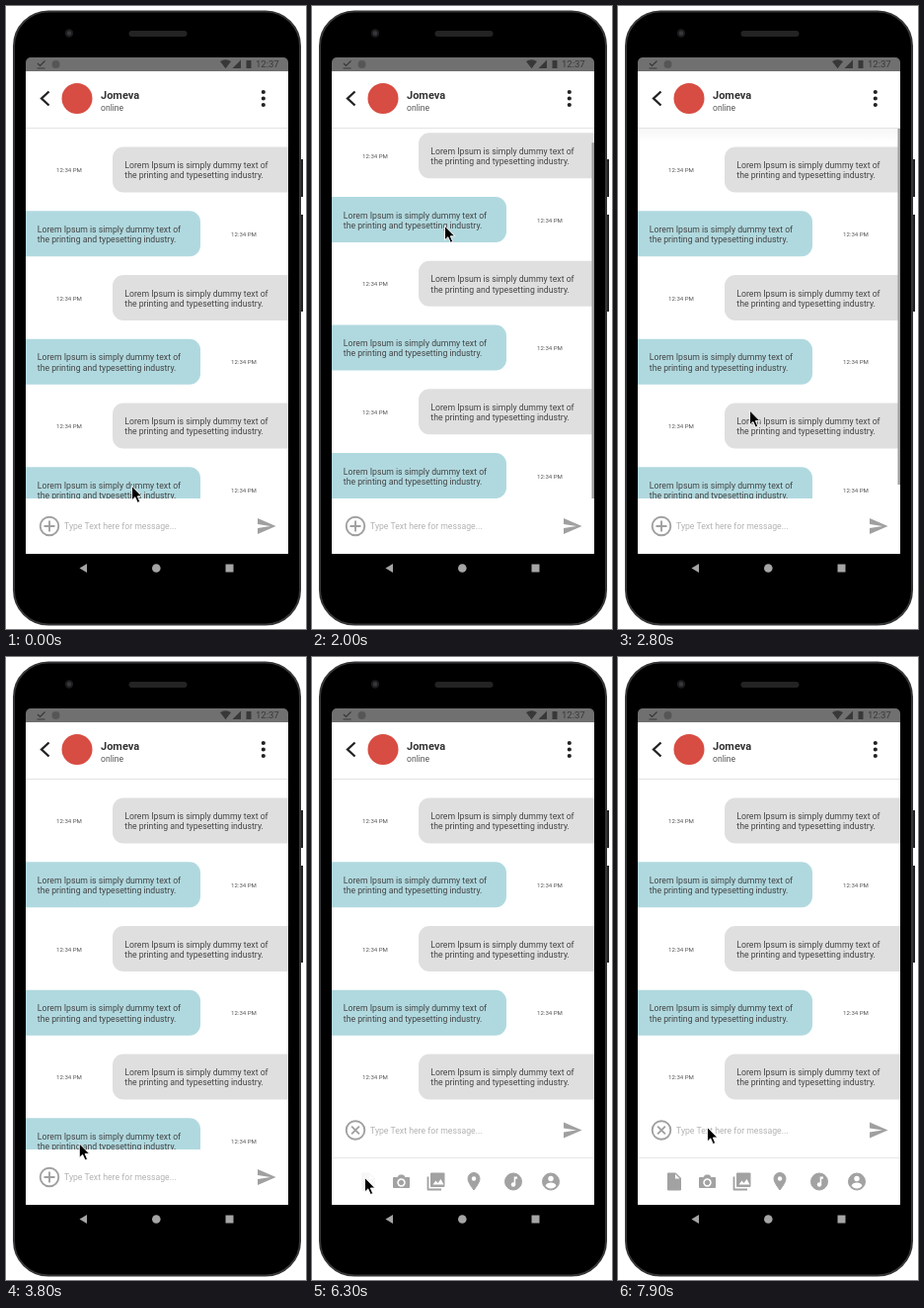
Recreate the animation shown at these times as an HTML page. Size 304 by 630 pixels, loop 8 s.

```html
<!DOCTYPE html>
<html lang="en">
<head>
<meta charset="utf-8">
<title>Chat screen</title>
<style>
  html, body { margin: 0; width: 100%; height: 100%; overflow: hidden; background: #fff; }
  svg { display: block; width: 304px; height: 630px; font: 8.7px Roboto, sans-serif; }
  .msg { fill: #444; }
  .time { font-size: 6.1px; fill: #555; text-anchor: middle; }
  .icon { fill: #a2a2a2; stroke: #a2a2a2; stroke-linejoin: round; }
  .hole { fill: #fff; stroke: none; }
</style>
</head>
<body>
<svg viewBox="0 0 304 630">
  <defs>
    <clipPath id="listClip"><rect id="listArea" x="20" y="124" width="266" height="374"/></clipPath>
    <linearGradient id="shade" x2="0" y2="1">
      <stop stop-opacity=".035"/>
      <stop offset="1" stop-opacity="0"/>
    </linearGradient>
  </defs>

  <!-- phone -->
  <path d="M297 155h4v38h-4zM297 211h4v98h-4z" fill="#222"/>
  <rect x="8" y="5.500" width="290" height="620" rx="35" stroke="#343536" stroke-width="2"/>
  <circle cx="64" cy="27.500" r="3.200" fill="#37383b" stroke="#1c1c1e" stroke-width="2"/>
  <rect x="124.500" y="25" width="59" height="6" rx="3" fill="#232323"/>

  <!-- status bar -->
  <rect x="20" y="52" width="266" height="24" rx="5" fill="#707070"/>
  <g fill="#383838">
    <path d="M32 58l2.500 2.500 5-5M31.500 63h8" fill="none" stroke="#383838" stroke-width="1.200"/>
    <circle cx="50.500" cy="59" r="4" opacity=".45"/>
    <path d="M217 56q5.500-3.500 11 0l-5.500 7.200zM238 54.500v8.500h-8.500zM243.500 55h5v8h-5z"/>
    <text x="253" y="62.300" font-size="9.500">12:37</text>
  </g>
  <rect x="20" y="66" width="266" height="488" fill="#fff"/>

  <!-- messages -->
  <g clip-path="url(#listClip)">
    <g id="list"></g>
    <rect id="glow" x="20" y="124" width="266" height="14" fill="url(#shade)"/>
    <rect id="bar" x="283.500" y="124" width="2.500" height="360" fill="#a0a0a0"/>
  </g>

  <!-- header -->
  <path d="M20 123.500h266" stroke="#e3e3e3"/>
  <path d="M43.500 86.500l-7.500 7 7.500 7" fill="none" stroke="#222" stroke-width="2.300"/>
  <circle cx="72" cy="93.500" r="15.500" fill="#d84d43"/>
  <text x="96" y="94" font-size="11" font-weight="700" fill="#333">Jomeva</text>
  <text x="96" y="106" font-size="8.600" fill="#555">online</text>
  <path d="M260.800 87v14" stroke="#222" stroke-width="4.200" stroke-linecap="round" stroke-dasharray="0 6.500"/>

  <!-- input row and attachment panel -->
  <g id="inputRow">
    <g id="toggle" fill="none" stroke="#a0a0a0" stroke-width="1.900">
      <circle cx="44" cy="526" r="9.300"/>
      <path id="cross" d="M38.500 526h11M44 520.500v11"/>
    </g>
    <text x="59" y="529" fill="#b3b3b3">Type Text here for message...</text>
    <path d="M255 534l18.500-8-18.500-8v6l13 2-13 2z" fill="#a0a0a0"/>
  </g>
  <g id="panel"><path d="M20 506.500h266" stroke="#e8e8e8"/></g>

  <!-- navigation bar -->
  <g fill="#a5a5a5">
    <path d="M82 564v9l-7.500-4.500z"/>
    <circle cx="152.300" cy="568.500" r="4.300"/>
    <path d="M222.500 564.500h8v8h-8z"/>
  </g>

  <path id="cursor" d="M.5 .5v14.500l3.300-3.100 2.500 5.600 2.400-1-2.400-5.500h4.500z" stroke="#fff" stroke-width=".9"/>
</svg>

<script>
const LOOP = 8000, PANEL_OPENS = 4850, PANEL_SHIFT = 47.5, SCROLL_RANGE = 14.2;
const $ = id => document.getElementById(id);
const set = (id, name, value) => $(id).setAttribute(name, value);

// Outer bubble ends run past the list edge and are clipped there.
function message(i) {
  const y = 142.5 + i * 64.75, mine = i % 2 === 0;
  const line = (text, dy) => `<text class="msg" x="${mine ? 120.3 : 31.8}" y="${y + dy}">${text}</text>`;
  return `<rect x="${mine ? 108 : 7}" y="${y}" width="190" height="46" rx="11" fill="${mine ? '#dfdfdf' : '#b0d9df'}"/>`
    + line('Lorem Ipsum is simply dummy text of', 21.5)
    + line('the printing and typesetting industry.', 31.8)
    + `<text class="time" x="${mine ? 64 : 241}" y="${y + 25.6}">12:34 PM</text>`;
}
$('list').innerHTML = Array.from({ length: 6 }, (_, i) => message(i)).join('');

// Attachment icons, each drawn around its own centre.
const path = (d, attrs = '') => `<path d="${d}" ${attrs}/>`;
const disc = (y, r, attrs = '') => `<circle cy="${y}" r="${r}" ${attrs}/>`;
const hole = 'class="hole"';
function icon(id, x, shapes) {
  $('panel').innerHTML += `<g id="${id}" class="icon" transform="translate(${x} 530.5)">${shapes}</g>`;
}
icon('file', 57, path('M-6.500-8.500H1.500l5 5V8.500h-13z') + path('M1-7.500V-3H5.500z', hole));
icon('camera', 90.5, path('M-8-4h4l2-2.500h4l2 2.500h4v10H-8z') + disc(1, 4.2, hole) + disc(1, 2.2));
icon('gallery', 125.5, path('M-5-8.500H8.500V5H-5z') + path('M-8-5V8H5.500', 'fill="none" stroke-width="1.800"')
  + path('M-3 3l3-4 2 2.500 3-4 3 5.500z', hole));
icon('place', 164, path('M0 8.500Q-6 1-6-3A6 6 0 0 1 6-3Q6 1 0 8.500z') + disc(-3, 2.2, hole));
icon('music', 204, disc(0, 8.5) + disc(3, 2.2, hole) + path('M.7 3V-5H4v2.200H2.200V3z', hole));
icon('contact', 242, disc(0, 8.5) + disc(-3, 2.7, hole) + path('M-5.500 4Q-4 1 0 1T5.500 4Q3.500 7 0 7T-5.500 4z', hole));

const ramp = (t, start, length) => Math.min(1, Math.max(0, (t - start) / length));
const pulse = (t, on, off) => ramp(t, on, 150) - ramp(t, off, 250);
const easeOut = p => 1 - (1 - p) ** 3;

// The pointer glides to each spot in turn.
const glides = [
  { x: 134, y: 420, start: 0, length: 1100 },
  { x: 134, y: 205, start: 1600, length: 700 },
  { x: 133, y: 425, start: 2500, length: 520 },
  { x: 42, y: 527, start: 3600, length: 680 },
  { x: 53, y: 526, start: 5500, length: 800 },
  { x: 90, y: 475, start: 6950, length: 850 }
];
function pointer(t) {
  let x = 127, y = 485;
  for (const glide of glides) {
    const p = easeOut(ramp(t, glide.start, glide.length));
    x += (glide.x - x) * p;
    y += (glide.y - y) * p;
  }
  return `translate(${x} ${y})`;
}

function frame(now) {
  const t = now % LOOP, open = t >= PANEL_OPENS;
  const offset = SCROLL_RANGE * (ramp(t, 1600, 150) - ramp(t, 2500, 150));
  set('list', 'transform', `translate(0 ${-offset})`);
  set('listArea', 'height', open ? 374 - PANEL_SHIFT : 374);
  set('bar', 'y', 124 + offset);
  set('bar', 'opacity', pulse(t, 1600, 2200) + pulse(t, 2500, 3250));
  set('glow', 'opacity', pulse(t, 2600, 2900));
  set('inputRow', 'transform', `translate(0 ${open ? -PANEL_SHIFT : 0})`);
  set('cross', 'transform', `rotate(${open ? 45 : 0} 44 526)`);
  set('toggle', 'opacity', 1 - .75 * pulse(t, 4550, 5080));
  set('panel', 'visibility', open ? 'visible' : 'hidden');
  set('file', 'opacity', 1 - .92 * pulse(t, 6050, 6480));
  set('cursor', 'transform', pointer(t));
  requestAnimationFrame(frame);
}
frame(performance.now());
</script>
</body>
</html>
```
